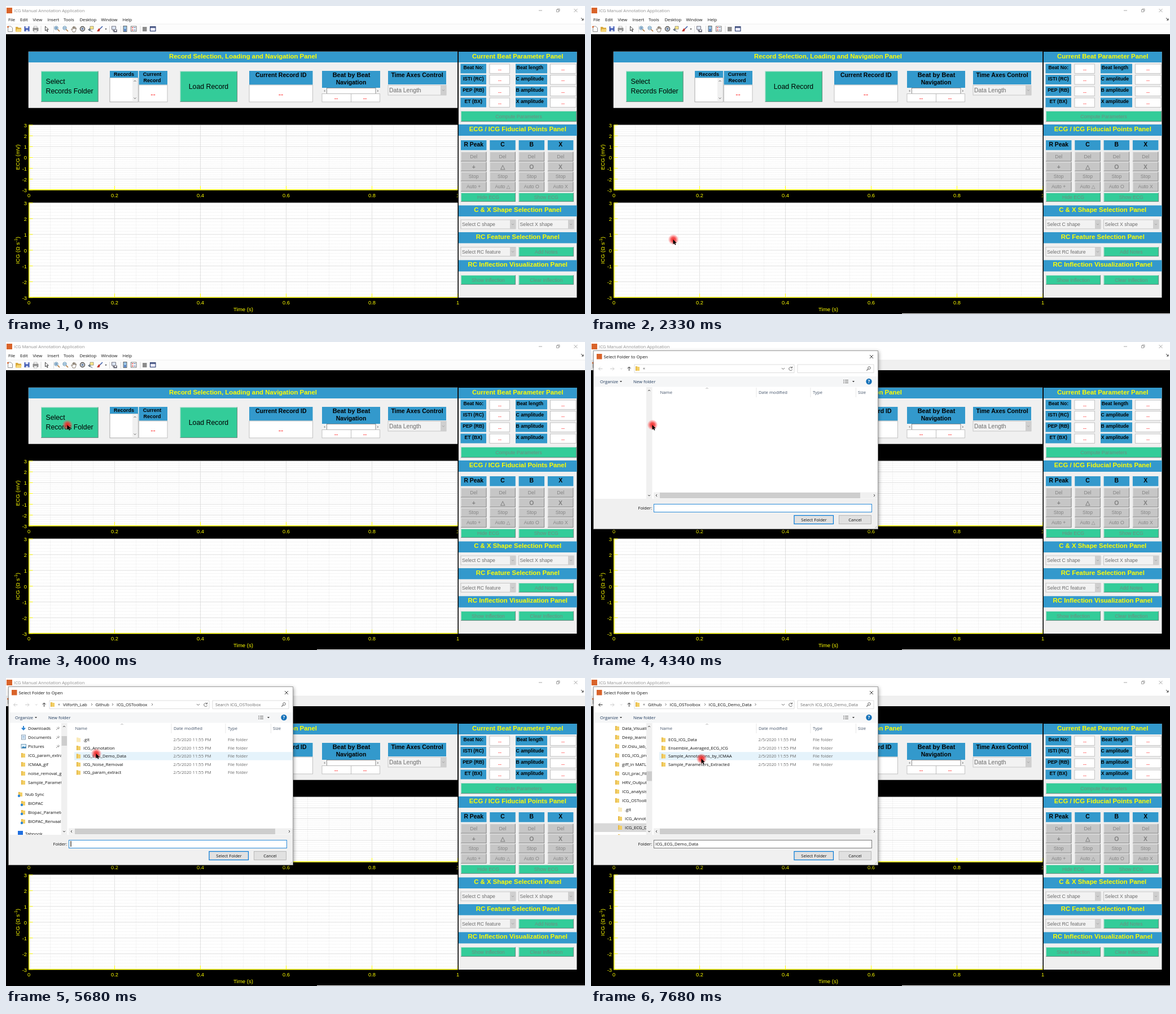
Write an HTML page that moves like this. It is 1026 by 546 pixels and loops after 8000 ms.

```html
<!DOCTYPE html>
<html lang="en">
<head>
<meta charset="utf-8">
<title>Annotation application</title>
<style>
html, body { margin: 0; width: 100%; height: 100%; overflow: hidden; background: #000; }
svg { display: block; width: 1026px; height: 546px; }
text { white-space: pre; }
.ui { font-family: "Open Sans", "Noto Sans", sans-serif; }
.fig { font-family: "Liberation Sans", Arial, sans-serif; }
</style>
</head>
<body>
<script>
const LOOP = 8000;
const BLUE = '#3399cc', GREEN = '#33cc99', PANEL = '#f0f0f0', YELLOW = '#ffff00', RED = '#ff2020';

// Markup helpers; text is placed by the middle of its capitals.
const rect = (x, y, x2, y2, fill, stroke, w = .8) =>
  `<rect x="${x}" y="${y}" width="${x2 - x}" height="${y2 - y}" fill="${fill}"` +
  (stroke ? ` stroke="${stroke}" stroke-width="${w}"` : '') + '/>';
const line = (d, stroke = '#444', w = 1, more = '') =>
  `<path d="${d}" fill="none" stroke="${stroke}" stroke-width="${w}" ${more}/>`;
const fill = (d, color) => `<path d="${d}" fill="${color}"/>`;
const circle = (x, y, r, color, more = '') => `<circle cx="${x}" cy="${y}" r="${r}" fill="${color}" ${more}/>`;
const text = (x, y, s, size, color = '#111', anchor = 'start', more = '') =>
  `<text x="${x}" y="${(y + size * .358).toFixed(2)}" font-size="${size}" fill="${color}" text-anchor="${anchor}" ${more}>${s}</text>`;
const mid = (x, y, s, size, color, more) => text(x, y, s, size, color, 'middle', more);
const bold = (x, y, s, size, color = '#000') => mid(x, y, s, size, color, 'font-weight="700"');
const ui = (x, y, s, color, size = 7.7) => text(x, y, s, size, color);
const group = (cls, ...parts) => `<g class="${cls}">${parts.flat().join('')}</g>`;
const during = (from, to, ...parts) => `<g data-from="${from}" data-to="${to}">${parts.flat().join('')}</g>`;
const range = n => [...Array(n).keys()];

function titleBar(color) {
  return text(14, 8, 'ICG Manual Annotation Application', 7.7, color) +
    line('M944 8h6M975.5 6.5h4v4h-4zM977 6.5v-1.5h4v4h-1.5M1006.5 5l6 6m0-6l-6 6', color, .8);
}

function chrome() {
  const menu = [[4, 'File'], [25, 'Edit'], [47.5, 'View'], [73.5, 'Insert'], [102, 'Tools'],
    [130.5, 'Desktop'], [168.5, 'Window'], [206.5, 'Help']];
  const lens = x => circle(x - 1, 39, 3.2, '#d5ebfa', 'stroke="#4a7a9c" stroke-width=".8"') +
    line(`M${x + 1.5} 41.5l3.5 3.5`, '#b5793a', 1.6) + line(`M${x - 3} 39h4`, '#2a5a8c', .8);
  return group('ui',
    rect(0, 0, 1026, 50, '#fff'),
    rect(1, 3, 11, 13, '#d9632a'),
    during(0, 3670, titleBar('#8f8f8f')),
    during(3670, 4000, titleBar('#111')),
    during(4000, LOOP, titleBar('#8f8f8f')),
    menu.map(([x, s]) => ui(x, 24, s)),
    line('M1019 21l4 4m0-3v3h-3', '#222', .9),
    during(0, 4340, rect(0, 32, 1026, 50, '#fcfcfc')),
    during(4340, LOOP, rect(0, 32, 1026, 50, PANEL)),
    line('M0 32h1026', '#e4e4e4', .6),
    line('M3.5 36h5l3 3v6.5h-8z', '#777', .8), circle(3.5, 37, 1.5, '#d9632a'),
    fill('M17 37h4l1 1.5h5v7h-10z', '#d9a93c'), fill('M19 41h9l-2 4.5h-9z', '#f7d774'),
    rect(32.5, 36, 41.5, 45, '#3b55b0'), rect(34.5, 36, 39.5, 39.5, '#dfe6fa'), rect(35, 42, 39.5, 45, '#c5cdea'),
    rect(48, 39, 57, 44, '#9c9c9c', '#666', .6), rect(49.5, 36, 55, 39, '#fff', '#777', .5), rect(49.5, 42.5, 55, 46, '#fff', '#777', .5),
    line('M62 35v12M84.5 35v12M183.5 35v12M203.5 35v12M238 35v12', '#ccc', .7),
    line('M69.5 36v8l2-2 1.5 3.5 1.2-.6-1.5-3.3h2.6z', '#333', .9),
    lens(90), line('M89 37v4', '#2a5a8c', .8), lens(105),
    line('M118 45l-2.5-4 1-.6 1.5 1.6v-4.5l1.2-.2.3 3v-4l1.3 0 .2 4 .7-3.5 1.2.3-.1 3.7.8-2 1 .4-1 4-1.2 2.8h-4z', '#6d5f4d', .8),
    circle(135.5, 40.5, 4, 'none', 'stroke="#444" stroke-width="1.4"'), rect(134, 39, 137, 42, '#8aa9d8', '#345', .6),
    rect(149, 36, 155, 41, '#ffe98a', '#665', .6), line('M146 41c2 4 5 2 7 5M148 39v5M145.5 42h5', '#345', .9),
    line('M171 36l-5 5', '#3457a5', 1.5), fill('M167 40l-1.5 5h-4.5l3-5z', '#c43c32'), fill('M175.3 40h3.4l-1.7 2z', '#333'),
    rect(187.5, 36, 194.5, 41.5, '#dfe8f5', '#556', .8), line('M189 43.5h4m-2.5 2h5.5v-4', '#445', 1.3),
    rect(208, 35.5, 214, 45.5, '#9cc6e8', '#444', .8), rect(209.5, 41, 212.5, 44.5, '#4b73bd'),
    rect(221.5, 36, 231, 45, '#fff', '#555', .8), line('M223 38.5h2.5M223 42.5h2.5', '#d33', 1.3), line('M226.5 38.5h3M226.5 42.5h3', '#36a', 1.1),
    rect(242, 37, 249.5, 45, '#8c8c8c'),
    rect(255.5, 36.5, 265, 44.5, '#eef', '#2d3e70', 1.1), line('M255.5 38h9.5', '#2d3e70', 1.5));
}

function axes(top, bottom, xLabelY) {
  const left = 40.5, right = 800.5, w = right - left, h = bottom - top;
  const xs = n => range(n + 1).map(i => left + w * i / n);
  const ys = n => range(n + 1).map(i => top + h * i / n);
  const cols = n => xs(n).map(x => `M${x.toFixed(1)} ${top}V${bottom}`).join('');
  const rows = n => ys(n).map(y => `M${left} ${y.toFixed(1)}H${right}`).join('');
  return rect(left, top, right, bottom, '#fff') +
    line(cols(20) + rows(30), '#d6d6d6', .6, 'stroke-dasharray="1 1.4"') +
    line(cols(5) + rows(6), '#dcdcdc', .8) +
    line(xs(5).map(x => `M${x} ${bottom}v-7`).join('') + ys(6).map(y => `M${left} ${y}h7`).join(''), YELLOW) +
    line(`M${left + .3} ${top}V${bottom - .3}H${right}`, YELLOW, 1.5) +
    xs(5).map((x, i) => mid(x, xLabelY, +(i * .2).toFixed(1), 9.3, YELLOW)).join('') +
    ys(6).map((y, i) => text(37, y + .5, 3 - i, 9.3, YELLOW, 'end')).join('');
}

const field = (x, y, x2, y2, tx, ty, size = 9) =>
  rect(x, y, x2, y2, '#fff', '#b5b5b5') + mid(tx, ty, '--', size, RED);
const tag = (x, y, x2, y2, s, size, ty, tx = (x + x2) / 2) => rect(x, y, x2, y2, BLUE) + bold(tx, ty, s, size);
// Raised face: light above and left, dark below and right.
const face = (x, y, x2, y2, color) => rect(x, y, x2, y2, color) +
  line(`M${x + .4} ${y2}V${y + .4}H${x2}`, '#e6e6e6', .8) + line(`M${x} ${y2 - .4}H${x2 - .4}V${y}`, '#777', .8);
const button = (x, y, x2, y2, s, color = GREEN, ink = '#6f8c80') =>
  face(x, y, x2, y2, color) + mid((x + x2) / 2, (y + y2) / 2, s, 8.7, ink);
const select = (x, y, x2, y2, s, size = 8.7) =>
  rect(x, y, x2, y2, '#f2f2f2', '#bcbcbc') + rect(x2 - 10, y, x2, y2, '#cfcfcf') +
  line(`M${x2 - 7} ${(y + y2) / 2 - 1}l2 2 2-2`, '#999', .8) + text(x + 2, (y + y2) / 2, s, size, '#6d6d6d');
const header = (x, x2, y, y2, s) => rect(x, y, x2, y2, BLUE) + bold((x + x2) / 2, y + 7.5, s, 11.4, YELLOW);

function recordPanel() {
  return [
    rect(40, 81, 800, 180.5, PANEL, '#ddd', .6), header(40, 800, 81, 100, 'Record Selection, Loading and Navigation Panel'),
    face(62, 115.5, 163.5, 170, GREEN),
    text(70.5, 134, 'Select', 12.3, '#000'), text(70.5, 150.5, 'Records Folder', 12.3, '#000'),
    rect(184, 127, 234, 170, '#fff', '#999'), tag(184, 115, 234, 127, 'Records', 9, 121),
    rect(224, 128, 233.5, 169.5, '#f0f0f0'), line('M226.5 134l2-2 2 2M226.5 162.5l2 2 2-2', '#555', .9),
    rect(235.5, 115, 286, 139.5, BLUE), bold(259, 121, 'Current', 9), bold(259, 131.5, 'Record', 9),
    field(235.5, 140, 286, 170, 260.5, 156.5, 13),
    face(308.5, 115.5, 410, 170, GREEN), mid(359, 142.5, 'Load Record', 12.3, '#000'),
    tag(431, 115, 543.5, 139.5, 'Current Record ID', 10.5, 122.5), field(431, 140, 543.5, 170, 487, 156.5, 13),
    rect(560, 115, 663, 145, BLUE), bold(612, 122, 'Beat by Beat', 11), bold(611.5, 135, 'Navigation', 10.5),
    rect(560, 145.5, 663, 155.5, '#f2f2f2'), rect(568.5, 145.5, 655, 155.5, '#fff', '#777'),
    line('M565.5 149l-1.5 1.5 1.5 1.5M658 149l1.5 1.5-1.5 1.5', '#333', .8),
    field(560, 155.5, 611.5, 170, 585, 163.5, 10), field(611.5, 155.5, 662.5, 170, 636, 163.5, 10),
    tag(677, 115, 780, 139, 'Time Axes Control', 10.5, 122.5), select(677, 140.5, 780, 158, 'Data Length', 10.4)
  ];
}

function sidePanel() {
  const rows = [['Beat No:', 'Beat length', 102.5], ['ISTI (RC)', 'C amplitude', 122], ['PEP (RB)', 'B amplitude', 142.5], ['ET (BX)', 'X amplitude', 162.5]];
  const heads = [[81, 100, 'Current Beat Parameter Panel'], [210, 230, 'ECG / ICG Fiducial Points Panel'],
    [353.5, 373, 'C &amp; X Shape Selection Panel'], [401, 420.5, 'RC Feature Selection Panel'], [450.5, 470.5, 'RC Inflection Visualization Panel']];
  const marks = ['+', '△', 'O', 'X'];
  const cols = ['R Peak', 'C', 'B', 'X'].map((name, i) => {
    const x = 806 + i * 51.3, x2 = x + 45.5, gray = (y, y2, s) => button(x, y, x2, y2, s, '#c6c6c6', '#858585');
    return tag(x, 238, x2, 255.5, name, 10.4, 245.5) + gray(258.5, 275.5, 'Del') +
      face(x, 276.5, x2, 293, '#c6c6c6') + bold(x + 22.7, 285.5, marks[i], 10.5, '#808080') +
      gray(294, 310.5, 'Stop') + gray(311.5, 329, 'Auto ' + marks[i]);
  });
  return [
    rect(800.5, 81, 802, 517, '#000'), rect(802, 81, 1011.5, 517, PANEL),
    heads.map(([y, y2, s]) => header(802, 1011.5, y, y2, s)),
    rows.map(([a, b, y]) => tag(805.5, y, 851, y + 17, a, 8.7, y + 6.5) + field(857, y + .5, 892.5, y + 17, 875, y + 10) +
      tag(903, y, 959, y + 17, b, 8.7, y + 6.5, 928.3) + field(964.5, y + .5, 1010, y + 17, 987, y + 10)),
    button(806, 186, 1011, 205, 'Compute Parameters'), cols,
    button(806, 331, 903, 347, 'Hide ECG'), button(908.5, 331, 1006, 347, 'Show ECG'),
    select(806, 379, 903, 395, 'Select C shape'), select(908.5, 379, 1006, 395, 'Select X shape'),
    select(806, 427.5, 903, 443.5, 'Select RC feature'), button(908.5, 427, 1006, 444, 'Add Notes'),
    button(806, 477, 903, 494, 'Show Inflection'), button(908.5, 477, 1006, 494, 'Clear Inflection')
  ];
}

function figure() {
  const turn = (x, y, s) => `<g transform="translate(${x} ${y}) rotate(-90)">${mid(0, 0, s, 9.8, YELLOW)}</g>`;
  return group('fig', rect(0, 50, 1026, 546, '#000'),
    axes(211, 326, 336), axes(349, 516.7, 525.5),
    turn(20, 268, 'ECG (mV)'), turn(20, 433, 'ICG (Ω s<tspan dy="-4" font-size="7.5">-1</tspan><tspan dy="4">)</tspan>'),
    mid(420.5, 538, 'Time (s)', 9.7, YELLOW), recordPanel().join(''), sidePanel().flat().join(''),
    during(330, LOOP, rect(551, 545, 1026, 546, '#fff')));
}

// Folder dialog
const folder = (x, y) => fill(`M${x} ${y - 4}h3l1 1h3v7h-7z`, '#f3cf66') + fill(`M${x} ${y - 4}h1.5v8h-1.5z`, '#e2b23c');
const paleFolder = (x, y) => fill(`M${x} ${y - 4}h3l1 1h3v7h-7z`, '#faeab8');
const sep = x => line(`M${x - 1} 45l2 2-2 2`, '#555', .8);

function files(names) {
  return names.map((s, i) => {
    const y = 109.5 + i * 14.5;
    return (s === '.git' ? paleFolder : folder)(125, y) + ui(137, y, s) +
      ui(296.5, y, '2/5/2020 11:55 PM', '#6d6d6d') + ui(393, y, 'File folder', '#6d6d6d');
  });
}
function branch(names, thumbY, deep = 99) {
  return [
    rect(5, 257.5, 98, 273, '#d9d9d9'),
    '<g clip-path="url(#tree)">',
    names.map((s, i) => {
      const y = 89 + i * 16, x = i >= deep ? 48 : 43;
      return (s === '.git' ? paleFolder : folder)(x, y) + ui(i >= deep ? 60 : 55, y, s);
    }), folder(48, 281), '</g>', rect(98.5, thumbY, 108, thumbY + 17, '#cdcdcd')
  ].flat();
}
function quickAccess() {
  const pin = y => line(`M89 ${y + 3}l2.5-2.5m-1-2l3 3m-1-4l2 2-2 1.5`, '#777', .9);
  const items = [['ICG_param_extract', 137], ['ICMAA_gif', 153], ['noise_removal_gif', 169], ['Sample_Parameters', 185],
    ['BIOPAC', 222], ['Biopac_Parameters', 238], ['BIOPAC_Renvaal', 254]];
  return ['<g clip-path="url(#tree)">',
    line('M31 85v6m-3-2.5l3 3 3-3', '#2b83d3', 2), rect(27.5, 101, 34.5, 109, '#eef4fa', '#6d8aa5'), line('M29 103.5h4M29 106h4', '#4b8bc8', .8),
    rect(27, 117.5, 35.5, 124.5, '#dceefa', '#5b88a8'), fill('M27.5 124l3-3 2 1.5 2.5-1v2.5z', '#2f7fb5'),
    ['Downloads', 'Documents', 'Pictures'].map((s, i) => ui(39, 89 + i * 16, s) + pin(89 + i * 16)),
    items.map(([s, y]) => folder(27, y) + (y > 200 ? circle(28, y + 3, 2.2, '#2a86d8') : '') + ui(39, y, s)),
    folder(22, 206), circle(23, 209, 2.2, '#2a86d8'), ui(34, 206.5, 'Nub Sync'),
    rect(21, 271, 30, 279, '#1f6fe0'), ui(34, 276, 'Tabnook'), '</g>', rect(98.5, 103, 108, 120, '#cdcdcd')].flat();
}
const path = (parts, seps) => parts.map(([x, s]) => ui(x, 47, s)).join('') + seps.map(sep).join('');

function dialog() {
  const tree = ['Box-Plot-with', 'Dorvano-GUI', 'Check_ann', 'Data_Visualize', 'Deep_learning', 'Dr.Oslu_lab_x',
    'ECG_ICG_prep', 'giff_in MATLAB', 'GUI_prac_Files', 'HRV_Outputs', 'ICG_analysis', 'ICG_OSToolbox'];
  const search = s => ui(371, 47, 'Search ' + s, '#6d6d6d');
  const hover = (from, to, row, color = '#e5f3fb') => during(from, to, rect(121, 102.2 + row * 14.5, 508, 116.7 + row * 14.5, color));
  const input = color => rect(111.5, 287.5, 497.5, 301.5, '#fff', color, 1);
  const tip = ['Date created: 2/5/2020 11:55 PM', 'Size: 12.1 MB', 'Folders: ECG_ICG_Data, Ensemble_Averaged_ECG_ICG, ...', 'Files: readme'];
  return group('ui', during(4340, LOOP,
    `<g filter="url(#shadow)">${rect(4.5, 15.5, 508.5, 331.5, '#fff', '#8a8a8a', .8)}</g>`,
    rect(10, 21, 19.5, 30.5, '#d9632a'), ui(22.5, 26, 'Select Folder to Open', '#111', 7.8),
    line('M494 23l6 6m0-6l-6 6', '#222', .9),
    during(4340, 7680, line('M20.5 47.5h-7m3-3l-3 3 3 3', '#ccc')),
    during(7680, LOOP, line('M20.5 47.5h-7m3-3l-3 3 3 3', '#333')),
    line('M34 47.5h7m-3-3l3 3-3 3M52 46.5l1.7 1.7 1.7-1.7', '#ccc'), line('M67.5 51v-7m-3 3l3-3 3 3', '#333'),
    rect(77, 40, 360, 54.5, '#fff', '#d5d5d5'), rect(366, 40, 501, 54.5, '#fff', '#d5d5d5'), folder(79, 47), ui(92, 46.5, '«', '#444'),
    line('M338 46l2.5 2.5 2.5-2.5M356 45.5a3 3 0 1 0 .6 3M356.5 43.5v2.5h-2.5', '#555', .9),
    circle(493, 46, 2.3, 'none', 'stroke="#555" stroke-width=".9"'), line('M491.3 47.7l-3 3', '#555', 1.1),
    rect(5, 61, 508, 79.5, '#f5f6f7'), ui(16, 70, 'Organize', '#1e395b'), fill('M51 69h4l-2 2.2z', '#333'), ui(75, 70, 'New folder', '#1e395b'),
    line('M447 67.5h2m1 0h6M447 70h2m1 0h6M447 72.5h2m1 0h6', '#777', 1), fill('M463 69h4l-2 2.2z', '#333'),
    circle(492.5, 70, 5.2, '#1270b8'), mid(492.5, 70, '?', 8, '#fff', 'font-weight="700"'),
    rect(98, 80, 108.5, 278, PANEL), line('M101 87l2-2 2 2M101 271l2 2 2-2', '#333', .9),
    ui(122.5, 89.5, 'Name', '#44546a'), ui(297, 89.5, 'Date modified', '#44546a'), ui(393, 89.5, 'Type', '#44546a'), ui(473, 89.5, 'Size', '#44546a'),
    line('M203.5 83l2-2 2 2', '#888', .7), line('M293 81v17M389 81v17M469.5 81v17', '#e2e2e2', .8),
    rect(111, 266.5, 508, 277.5, PANEL), rect(122, 267, 477, 277, '#cdcdcd'), line('M117 270l-2 2 2 2M501 270l2 2-2 2', '#333', .9),
    rect(5, 278, 508, 331, PANEL), ui(83.5, 294.5, 'Folder:'),
    during(4340, 7680, input('#2a8ad8')), during(7680, LOOP, input('#7a7a7a')),
    during(4670, 7350, line('M115 289v10', '#000', 1.1)),
    during(7350, LOOP, ui(114, 294, 'ICG_ECG_Demo_Data')),
    rect(360, 307.5, 429.5, 322.5, '#e1e1e1', '#0078d7', 1.2), mid(395, 315, 'Select Folder', 7.6),
    rect(439.5, 307.5, 496.5, 322.5, '#e1e1e1', '#adadad'), mid(468, 315, 'Cancel', 7.6),
    line('M503 330l4-4M505.5 330l1.5-1.5', '#aaa', .7),
    during(4670, 5340, path([[102, 'Data (D:)'], [148, 'Vilforth_Lab'], [205.5, 'Github'], [243, 'ICG_OSToolbox']], [141, 198, 236.5])),
    during(5340, 7680, path([[101, 'Vilforth_Lab'], [158.5, 'Github'], [196, 'ICG_OSToolbox']], [152, 189, 259])),
    during(7680, LOOP, path([[101, 'Github'], [139.5, 'ICG_OSToolbox'], [208.5, 'ICG_ECG_Demo_Data']], [132.5, 202, 291.5])),
    during(4670, 5010, branch(tree, 158).flat()), during(5010, 7680, quickAccess()),
    during(7680, LOOP, branch([...tree.slice(3), '.git', 'ICG_Annotation', 'ICG_ECG_Demo_Data'], 165.5, 9)),
    hover(5340, 5680, 0), hover(5680, 6010, 2), hover(6010, 6340, 0), hover(6340, 7010, 2), hover(7010, 7680, 2, '#cce8ff'), hover(7680, LOOP, 2),
    during(4670, 7680, search('ICG_OSToolbox'), files(['.git', 'ICG_Annotation', 'ICG_ECG_Demo_Data', 'ICG_Noise_Removal', 'ICG_param_extract'])),
    during(7680, LOOP, search('ICG_ECG_Demo_Data'), files(['ECG_ICG_Data', 'Ensemble_Averaged_ECG_ICG', 'Sample_Annotations_by_ICMAA', 'Sample_Parameters_Extracted'])),
    during(6680, 7010, rect(198, 153, 403, 199, 'rgba(0,0,0,.2)'), `<g opacity=".82">${rect(196, 151.5, 401, 197, '#fff', '#999')}</g>`,
      tip.map((s, i) => ui(198.5, 158.5 + i * 10.6, s, '#808080', 7.6)))));
}

const defs = `<defs><clipPath id="tree"><rect x="5" y="81" width="93" height="197"/></clipPath>
<filter id="shadow" x="-5%" y="-5%" width="110%" height="110%"><feDropShadow dx="1" dy="2" stdDeviation="3" flood-opacity=".4"/></filter>
<radialGradient id="glow"><stop offset="0" stop-color="#f02020" stop-opacity=".95"/><stop offset=".45" stop-color="#f53030" stop-opacity=".8"/>
<stop offset="1" stop-color="#ff6060" stop-opacity=".12"/></radialGradient></defs>`;
const pointer = `<g id="pointer">${circle(0, 0, 9, 'url(#glow)')}${fill('M-.5 0v8.5l2-1.7 1.5 3 1.5-.7-1.5-3h2.7z', '#000')}</g>`;

document.body.innerHTML = `<svg viewBox="0 0 1026 546">${defs}${chrome()}${figure()}${dialog()}${pointer}</svg>`;

// start time, x, y
const moves = [[2330, 146, 414], [2670, 51, 215], [3000, 185, 147], [3670, 109, 147],
  [5340, 128, 112], [5680, 160, 134], [6010, 180, 112], [6340, 196, 143]];
const timed = [...document.querySelectorAll('[data-from]')].map(el => [el, +el.dataset.from, +el.dataset.to]);
const hand = document.getElementById('pointer');

function draw(now) {
  const t = now % LOOP;
  for (const [el, from, to] of timed) el.style.display = t >= from && t < to ? '' : 'none';
  const at = moves.filter(m => m[0] <= t).pop();
  hand.style.display = at ? '' : 'none';
  if (at) hand.setAttribute('transform', `translate(${at[1]} ${at[2]})`);
}

const start = performance.now();
function tick() {
  draw(performance.now() - start);
  requestAnimationFrame(tick);
}
tick();
</script>
</body>
</html>
```
